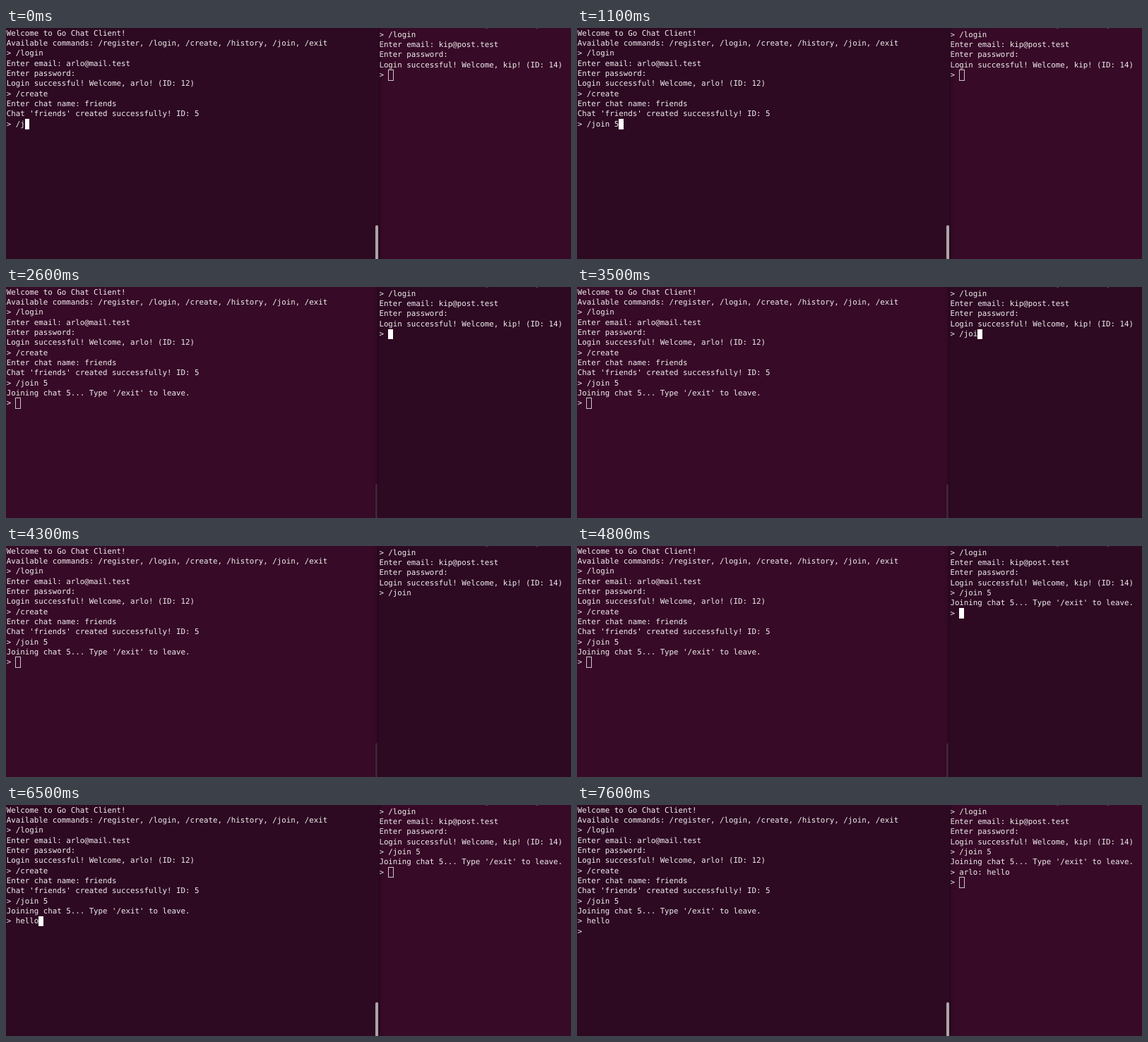
These frames come from a looping animation (800 by 328 pixels, 8000 ms). An HTML page:

```html
<!DOCTYPE html>
<html lang="en">
<head>
<meta charset="utf-8">
<title>Two chat terminals</title>
<style>
html, body { margin: 0; width: 100%; height: 100%; overflow: hidden; background: #2d0922; }
.pane { position: absolute; top: 0; height: 328px; }
#left { left: 0; }
#right { right: 0; width: 273px; }
.clip { position: absolute; inset: 0; overflow: hidden; }
pre {
  position: absolute; margin: 0; color: #f1eef0; white-space: pre;
  font: 10.797px/14.36px "DejaVu Sans Mono", monospace;
  text-rendering: geometricPrecision; font-variant-ligatures: none;
}
#left pre { left: .8px; top: .5px; }
#right pre { left: 1.4px; top: -11.8px; }
.cursor { position: absolute; box-sizing: border-box; margin-top: -.5px; width: 6.5px; height: 14.4px; background: #fff; }
.cursor.idle { margin: -1px 0 0 -.5px; width: 8px; height: 15.6px; border: 1px solid #cdc5ca; background: none; }
#handle { position: absolute; left: 523px; top: 280px; width: 4px; height: 52px; border-radius: 2px; }
</style>
</head>
<body>
<div class="pane" id="right"><div class="clip"><pre></pre></div></div>
<div class="pane" id="left"><div class="clip"><pre></pre><div id="handle"></div></div></div>
<script>
const LOOP = 8000, CELL = 6.5, ROW = 14.36, BLINK = 600;
const COMMANDS = "Available commands: /register, /login, /create, /history, /join, /exit\n";
const JOINED = "> /join 5\nJoining chat 5... Type '/exit' to leave.\n";

const login = (email, name, id) =>
  `> /login\nEnter email: ${email}\nEnter password:\nLogin successful! Welcome, ${name}! (ID: ${id})\n`;

const leftLog = "Welcome to Go Chat Client!\n" + COMMANDS + login("arlo@mail.test", "arlo", 12) +
  "> /create\nEnter chat name: friends\nChat 'friends' created successfully! ID: 5\n";
const rightLog = COMMANDS + login("kip@post.test", "kip", 14);

// Each step is [time, log, text after the log]; a step also restarts the cursor blink.
const prompt = (log, ...inputs) => inputs.map(([time, text]) => [time, log, "> " + text]);

const leftSteps = [
  ...prompt(leftLog, [0, "/j"], [100, "/jo"], [300, "/joi"], [400, "/join"], [500, "/join "], [1100, "/join 5"]),
  ...prompt(leftLog + JOINED, [1300, ""], [5800, ""], [6100, "h"], [6200, "he"], [6300, "hel"], [6500, "hello"]),
  ...prompt(leftLog + JOINED + "> hello\n", [7000, ""]),
];
const rightSteps = [
  ...prompt(rightLog, [0, ""], [2600, ""], [3100, "/"], [3400, "/j"], [3500, "/joi"], [3700, "/join "], [4400, "/join 5"]),
  [4700, rightLog + "> /join 5\n", ""],
  ...prompt(rightLog + JOINED, [4800, ""]),
  ...prompt(rightLog + JOINED + "> arlo: hello\n", [7000, ""]),
];

function makePane(id, steps) {
  const box = document.getElementById(id);
  const pre = box.querySelector("pre");
  const output = pre.appendChild(document.createTextNode(""));
  const cursor = pre.appendChild(document.createElement("div"));

  return (t, focused, raised) => {
    const [since, log, line] = steps.findLast(step => step[0] <= t);
    const text = log + line;
    if (output.data !== text) output.data = text;

    const visible = !focused || (t - since) % (2 * BLINK) < BLINK;
    cursor.className = focused ? "cursor" : "cursor idle";
    cursor.style.left = line.length * CELL + "px";
    cursor.style.top = (log.split("\n").length - 1) * ROW + "px";
    cursor.style.display = visible ? "" : "none";

    box.style.background = focused ? "#2d0922" : "#370a27";
    box.style.boxShadow = raised ? "0 0 0 1px #20071a, 0 0 6px rgba(0, 0, 0, .35)" : "none";
    box.style.zIndex = raised ? 2 : 1;
  };
}

const drawLeft = makePane("left", leftSteps);
const drawRight = makePane("right", rightSteps);
const leftBox = document.getElementById("left");
const handle = document.getElementById("handle");
const start = performance.now();

function draw() {
  const t = (performance.now() - start) % LOOP;
  // A window comes to the front just before its terminal takes the focus.
  const leftRaised = t < 2500 || t >= 5700;
  const leftFocused = t < 2600 || t >= 5800;
  drawLeft(t, leftFocused, leftRaised);
  drawRight(t, !leftFocused, !leftRaised);
  leftBox.style.width = leftRaised ? "528px" : "527px";
  handle.style.background = leftFocused ? "#aca5a9" : "#45273c";
  requestAnimationFrame(draw);
}
draw();
</script>
</body>
</html>
```
